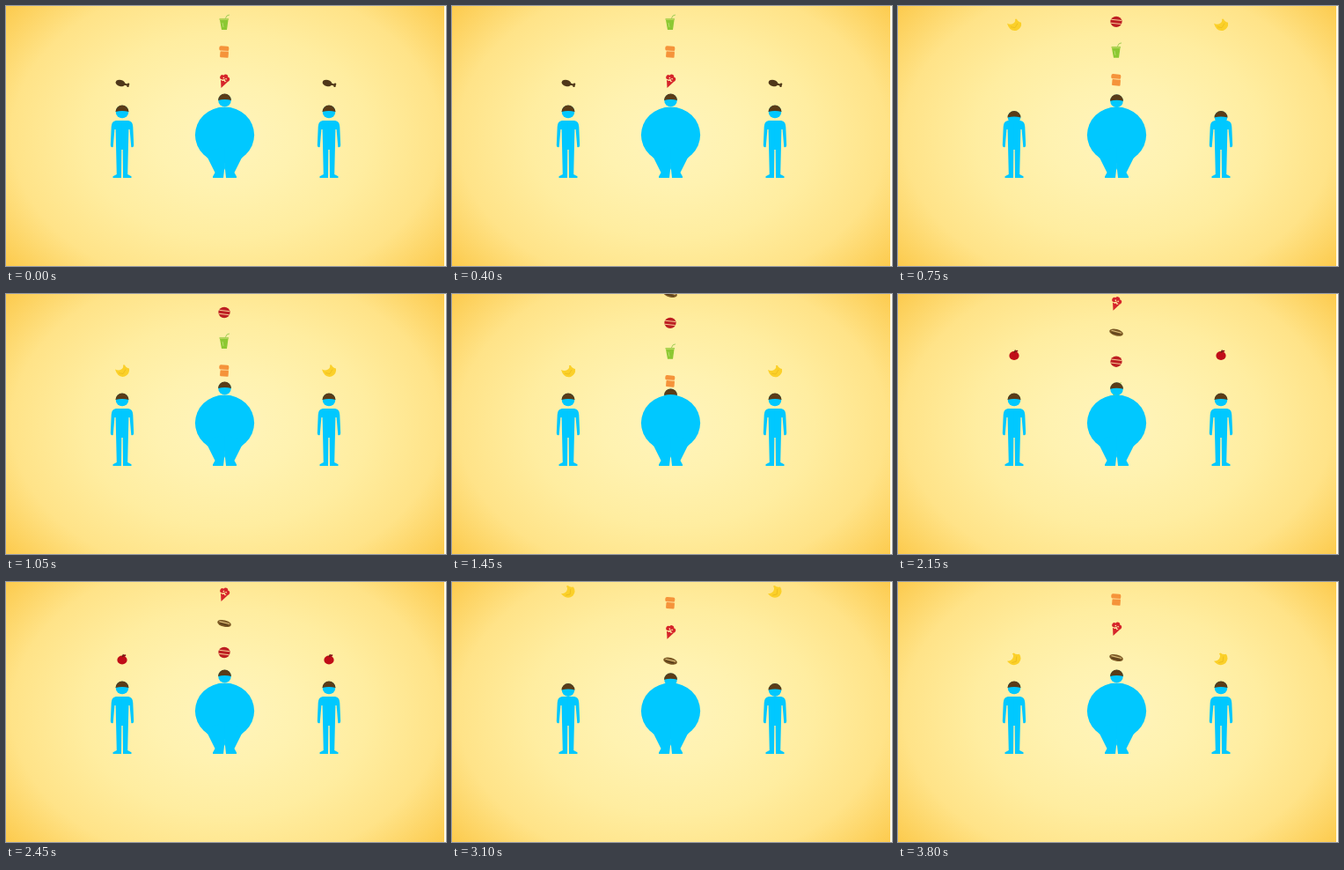
Recreate the animation shown at these times as an HTML page with a canvas. Size 500 px wide and 295 px high, loop 3850 ms.

```html
<!DOCTYPE html>
<html lang="en">
<head>
<meta charset="utf-8">
<style>
html, body { margin: 0; width: 100%; height: 100%; overflow: hidden; background: #ffe88e; }
canvas { display: block; }
</style>
</head>
<body>
<canvas id="stage" width="500" height="295"></canvas>
<script>
const ctx = document.getElementById('stage').getContext('2d');
const LOOP = 3850, STEP = 50;
const BLUE = '#00c8ff', HAIR = '#5a3c18', CREAM = '#fff0b0';

const smooth = u => { u = Math.max(0, Math.min(1, u)); return u * u * (3 - 2 * u); };
const bump = (t, peak, width) => Math.exp(-(((t - peak) / width) ** 2));
const sum = (list, f) => list.reduce((total, item) => total + f(item), 0);

function at(x, y, paint) {
  ctx.save();
  ctx.translate(x, y);
  paint();
  ctx.restore();
}

function mirrored(paint) {
  for (const side of [-1, 1]) {
    ctx.save();
    ctx.scale(side, 1);
    paint();
    ctx.restore();
  }
}

function fill(color, build) {
  ctx.fillStyle = color;
  ctx.beginPath();
  build(ctx);
  ctx.fill();
}

function line(color, width, ...points) {
  ctx.strokeStyle = color;
  ctx.lineWidth = width;
  ctx.beginPath();
  points.forEach(([x, y]) => ctx.lineTo(x, y));
  ctx.stroke();
}

const poly = (color, ...points) => fill(color, c => points.forEach(([x, y]) => c.lineTo(x, y)));
const oval = (color, x, y, rx, ry = rx, tilt = 0) =>
  fill(color, c => c.ellipse(x, y, rx, ry, tilt, 0, 7));

function banana(tilt) {
  ctx.rotate(tilt);
  fill('#fbd029', c => {
    c.moveTo(-8, -2);
    c.quadraticCurveTo(-4, 0, -1, -2);
    c.quadraticCurveTo(2, -4, 1, -7);
    c.lineTo(3, -7);
    c.quadraticCurveTo(4, -4, 8, -3);
    c.quadraticCurveTo(9, 3, 3, 6);
    c.quadraticCurveTo(-5, 8, -8, -2);
  });
  line('#eab91d', 0.7, [-4, 2], [1, 3], [4, -2]);
}

const food = {
  pizza() {
    const red = '#d6252a';
    poly(red, [-3.5, 8], [-4, -1], [4, 1]);
    ctx.rotate(0.4);
    for (let i = 0; i < 3; i++) oval(red, i * 3 - 3.5, -3 - (i % 2) * 2, 2.7);
    for (let i = 0; i < 4; i++) oval(CREAM, (i % 2) * 3 - 2, (i >> 1) * 3 - 3, 0.8);
  },
  sandwich() {
    const orange = '#f5933a';
    ctx.rotate(0.08);
    fill(orange, c => {
      c.roundRect(-6, -6.5, 11, 5.5, 2);
      c.roundRect(-4.5, -0.5, 9.5, 7, 1);
    });
    line('#fbc982', 1, [-4, -1], [5, -1]);
  },
  drink() {
    const green = '#8cc832';
    poly(green, [-5, -3], [4.5, -3], [3, 8], [-3, 8]);
    line(green, 1.3, [-5.5, -4], [5, -4]);
    line('#a5cf5a', 1, [1, -4], [3, -8], [6, -9]);
    line('#b4dc6c', 1, [-2, 0], [-1, 5]);
  },
  burger() {
    oval('#bd1f22', 0, 0, 6.6, 6.2);
    ctx.rotate(0.12);
    for (const y of [-2, 2]) line('#f6c994', 1, [-6, y], [6, y]);
  },
  hotdog() {
    ctx.rotate(0.25);
    oval('#7b5824', 0, 0, 8, 3.7);
    line('#d9bd7c', 1.2, [-6, -1], [6, -1]);
    line('#49331a', 0.8, [-5, 1.3], [5, 1.3]);
  },
  drumstick() {
    const brown = '#4f3719';
    ctx.rotate(0.25);
    oval(brown, -2, 0, 5.5, 3.6);
    line(brown, 2, [2, 0], [7, 0]);
    for (const y of [-1, 1]) oval(brown, 7, y, 1.3);
  },
  banana() { banana(0); },
  moonBanana() { banana(-0.45); },
  apple() {
    oval('#c00d18', 0, 0.5, 5.6, 5);
    line('#5a2a12', 1.2, [0, -3], [1.5, -6]);
    oval('#8d1118', 2.5, -4.5, 2, 1, -0.4);
  }
};

function drawFood(name, x, y) {
  if (y > -16 && y < 110) at(x, y, food[name]);
}

function head(y) {
  oval(BLUE, 0, y, 7.3);
  fill(HAIR, c => {
    c.arc(0, y, 7.5, Math.PI, 0);
    c.quadraticCurveTo(0, y - 2, -7.5, y);
  });
}

function slimFigure(dip) {
  mirrored(() => fill(BLUE, c => {
    c.moveTo(-0.3, 130);
    c.lineTo(7, 130);
    c.quadraticCurveTo(12, 130.5, 12.3, 137);
    c.lineTo(13.2, 158);
    c.quadraticCurveTo(13, 161, 10.3, 160);
    c.lineTo(8.6, 140);
    c.lineTo(7.4, 140);
    c.lineTo(6.2, 191);
    c.lineTo(10.5, 193.2);
    c.lineTo(10.5, 195);
    c.lineTo(1, 195);
    c.lineTo(0.7, 163);
    c.lineTo(-0.3, 163);
  }));
  head(120 + dip);
}

function roundFigure(dip) {
  oval(BLUE, 0, 146.3, 33.6, 31.8);
  mirrored(() => poly(BLUE, [-0.3, 160], [25, 166], [19, 173], [11, 189],
    [13.5, 193.5], [13.5, 195], [1.5, 195], [0.5, 186], [-0.3, 184]));
  head(107 + dip);
}

function background() {
  at(250, 147, () => {
    ctx.scale(1, 0.72);
    const glow = ctx.createRadialGradient(0, 0, 0, 0, 0, 325);
    ['#fff4bb', '#fff2b0', '#ffeda0', '#ffe388', '#fcca4c']
      .forEach((color, i) => glow.addColorStop(i / 4, color));
    ctx.fillStyle = glow;
    ctx.fillRect(-250, -210, 500, 420);
  });
  ctx.fillStyle = '#fffbea';
  ctx.fillRect(498, 0, 2, 295);
}

// Strips of food slide down into the heads; each bite pushes the head down.
const CENTER = {
  foods: ['pizza', 'sandwich', 'drink', 'burger', 'hotdog'],
  gap: 33,
  slides: [{ start: 440, by: 35 }, { start: 1250, by: 22 },
    { start: 1840, by: 37 }, { start: 2660, by: 39 }],
  fall: 380
};
const SIDE = {
  foods: ['drumstick', 'banana', 'apple', 'moonBanana'],
  gap: 99,
  starts: [550, 1774, 2939],
  fall: 520
};

function drawCenter(t) {
  const { foods, gap, slides, fall } = CENTER;
  const dip = sum(slides, s => 8 * bump(t, s.start + fall / 2, 80));
  const ride = 4 * bump(t, 3080, 70);
  const slide = 85 + ride + sum(slides, s => s.by * smooth((t - s.start) / fall));
  for (let i = 0; i < 8; i++) drawFood(foods[i % foods.length], 248, slide - i * gap);
  at(248.5, 0, () => roundFigure(Math.max(dip, ride)));
}

function drawSide(t, x) {
  const { foods, gap, starts, fall } = SIDE;
  const eaten = sum(starts, s => smooth((t - s) / fall));
  const dip = sum(starts, s => 8 * bump(t, s + 230, 65));
  foods.forEach((name, i) => drawFood(name, x, 88 + (eaten - i) * gap));
  at(x, 0, () => slimFigure(dip));
}

const start = performance.now();
function tick() {
  const t = Math.floor((performance.now() - start) % LOOP / STEP) * STEP;
  background();
  drawCenter(t);
  for (const x of [132, 367]) drawSide(t, x);
  requestAnimationFrame(tick);
}
tick();
</script>
</body>
</html>
```
